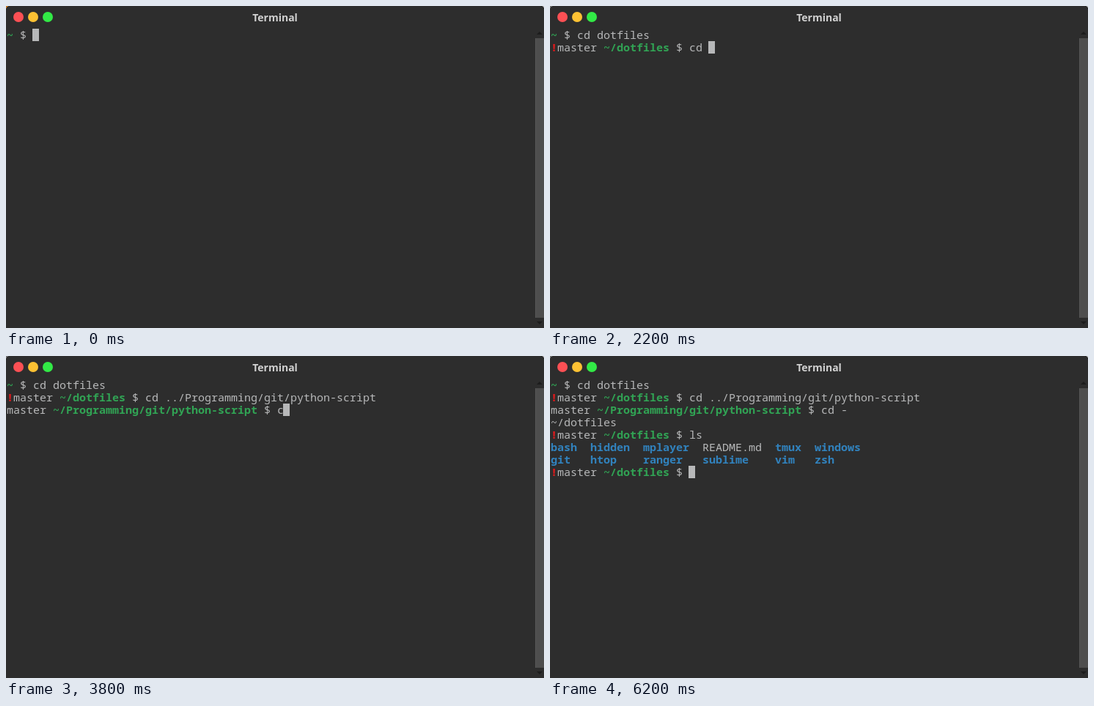
An HTML page with a canvas that plays this animation: 734x440 px, repeating every 7.4 s.

```html
<!DOCTYPE html>
<html lang="en">
<head>
<meta charset="utf-8">
<title>Terminal</title>
<style>
html, body { margin: 0; width: 100%; height: 100%; overflow: hidden; background: #2d2d2d; }
canvas { display: block; width: 734px; height: 440px; }
</style>
</head>
<body>
<canvas id="stage"></canvas>
<script>
const W = 734, H = 440, LOOP = 7400;
const CELL = 9, ROW = 17, LEFT = 1, TOP = 31;
const BG = '#2d2d2d', FG = '#b7b8b9', GREEN = '#31a354', BLUE = '#3182bd', RED = '#e31a1c', WHITE = '#fcfdfe';
const MONO = '15px "Noto Sans Mono", "DejaVu Sans Mono", monospace';

const canvas = document.getElementById('stage');
const ctx = canvas.getContext('2d');
const dpr = window.devicePixelRatio || 1;
canvas.width = W * dpr;
canvas.height = H * dpr;
ctx.scale(dpr, dpr);

// A span is [text, colour, bold].
const plain = text => [text, FG, false];
const bold = (text, colour) => [text, colour, true];
const prompt = (path, branch = '', dirty = false) => [
  bold(dirty ? '!' : '', RED), plain(branch), bold(path, GREEN), plain(' $ ')
];
const dotfiles = prompt('~/dotfiles', 'master ', true);
const listing = names => names.map(([name, width]) =>
  (name === 'README.md' ? plain : text => bold(text, BLUE))(name.padEnd(width)));

// Each session: output printed before the prompt, the prompt, and the command once entered.
const sessions = [
  { output: [], prompt: prompt('~'), command: 'cd dotfiles' },
  { output: [], prompt: dotfiles, command: 'cd ../Programming/git/python-script' },
  { output: [], prompt: prompt('~/Programming/git/python-script', 'master '), command: 'cd -' },
  { output: [[plain('~/dotfiles')]], prompt: dotfiles, command: 'ls' },
  {
    output: [
      listing([['bash', 6], ['hidden', 8], ['mplayer', 9], ['README.md', 11], ['tmux', 6], ['windows', 7]]),
      listing([['git', 6], ['htop', 8], ['ranger', 9], ['sublime', 11], ['vim', 6], ['zsh', 3]])
    ],
    prompt: dotfiles, command: ''
  }
];

// [start ms, session, typed text]
const steps = [
  ...['', 'c', 'cd', 'cd ', 'cd d', 'cd do', 'cd dot', 'cd dotfiles/'].map((s, i) => [i * 200, 0, s]),
  ...['', 'c', 'cd', 'cd ', 'cd ..', 'cd ../P', 'cd ../Programming/', 'cd ../Programming/git/',
    'cd ../Programming/git/py', 'cd ../Programming/git/python-script/'].map((s, i) => [1600 + i * 200, 1, s]),
  ...['', 'c', 'cd ', 'cd -'].map((s, i) => [3600 + i * 200, 2, s]),
  [4400, 3, ''], [5200, 3, 'ls'], [6200, 4, '']
];

function rect(x, y, w, h, colour) {
  ctx.fillStyle = colour;
  ctx.fillRect(x, y, w, h);
}

function triangle(x, y, dir) {
  ctx.fillStyle = '#1c1c1c';
  ctx.beginPath();
  ctx.moveTo(x - 4, y + 2 * dir);
  ctx.lineTo(x + 4, y + 2 * dir);
  ctx.lineTo(x, y - 2 * dir);
  ctx.fill();
}

function drawWindow(t) {
  rect(0, 0, W, H, BG);
  rect(0, 0, 3, 1, t < 200 ? '#d9801f' : '#777777');
  rect(0, 1, 1, 2, t < 200 ? '#d9801f' : '#777777');
  rect(W - 2, 0, 2, 1, '#b0b0b0');
  rect(W - 1, 1, 1, 1, '#b0b0b0');

  ['#fc5054', '#fcc133', '#32e946'].forEach((colour, i) => {
    ctx.fillStyle = colour;
    ctx.beginPath();
    ctx.arc(17 + i * 20, 15, 7, 0, Math.PI * 2);
    ctx.fill();
  });

  ctx.font = 'bold 14px "Open Sans", "Noto Sans", sans-serif';
  ctx.textAlign = 'center';
  ctx.fillStyle = '#d2d2d2';
  ctx.fillText('Terminal', 367, 21);

  rect(722, 44, 12, 382, '#4e4e4e');
  rect(722, 44, 1, 382, '#565656');
  triangle(728, 37, 1);
  triangle(728, 433, -1);
}

// Draws spans on the character grid and returns the next column.
function drawLine(spans, row) {
  let col = 0;
  ctx.textAlign = 'left';
  for (const [text, colour, heavy] of spans) {
    ctx.font = (heavy ? 'bold ' : '') + MONO;
    ctx.fillStyle = colour;
    for (const ch of text) ctx.fillText(ch, LEFT + CELL * col++, TOP + ROW * row + 14);
  }
  return col;
}

function typedSpans(text) {
  // A trailing slash added by completion stands out until the next key.
  return text.endsWith('/') ? [plain(text.slice(0, -1)), bold('/', WHITE)] : [plain(text)];
}

function draw(t) {
  drawWindow(t);
  const [, current, typed] = steps.findLast(step => step[0] <= t);
  let row = 0;
  sessions.slice(0, current + 1).forEach((session, i) => {
    for (const line of session.output) drawLine(line, row++);
    const input = i < current ? [plain(session.command)] : typedSpans(typed);
    const col = drawLine([...session.prompt, ...input], row);
    if (i === current) rect(LEFT + CELL * col - 1, TOP + ROW * row, CELL, ROW, FG);
    row++;
  });
}

const start = performance.now();
function tick() {
  draw((performance.now() - start) % LOOP);
  requestAnimationFrame(tick);
}
tick();
</script>
</body>
</html>
```
